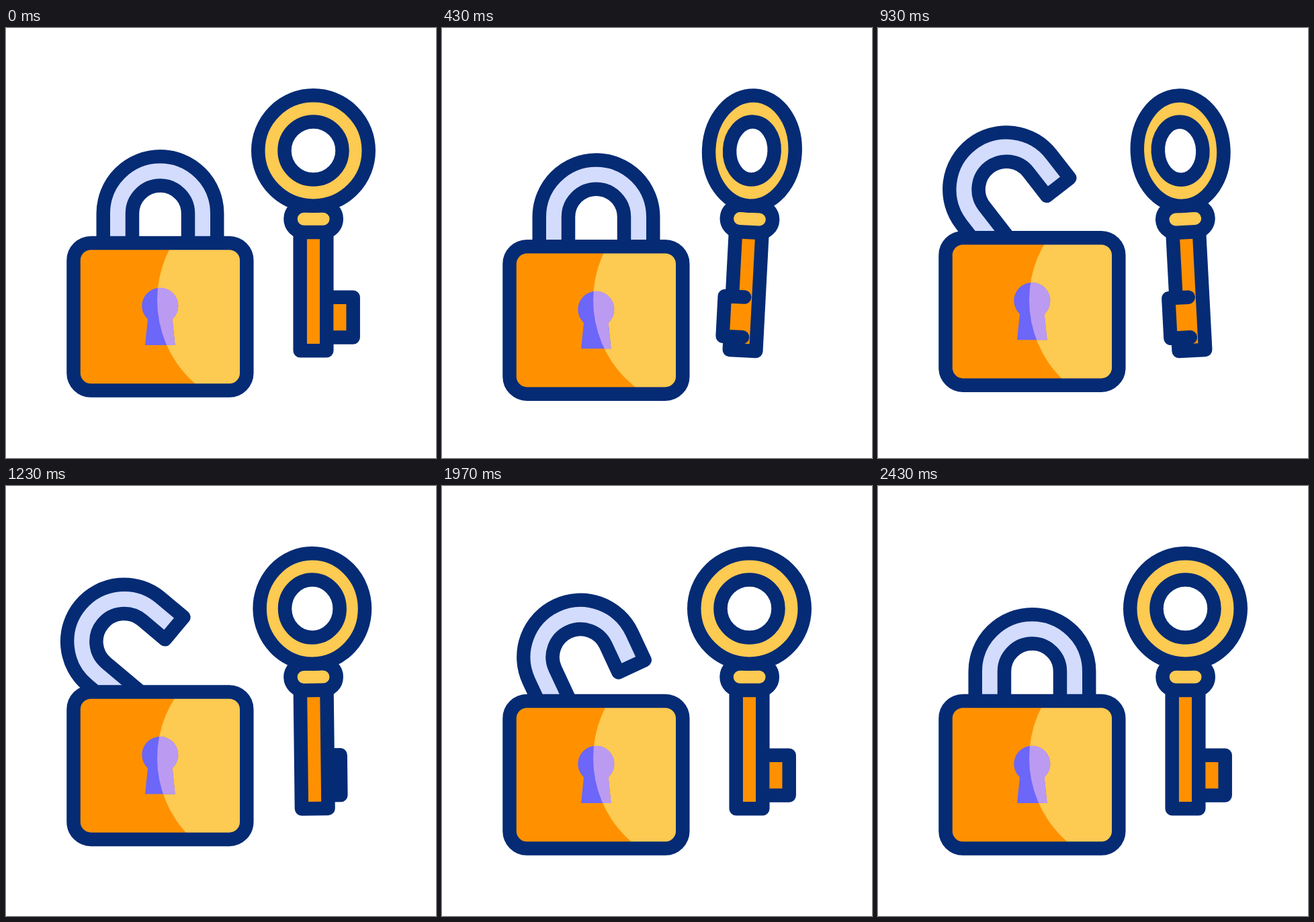
Recreate the animation shown at these times as an HTML page. Size 640 by 640 pixels, loop 2530 ms.

```html
<!DOCTYPE html>
<html lang="en">
<head>
<meta charset="utf-8">
<title>Padlock and key</title>
<style>
  html, body { margin: 0; width: 100%; height: 100%; overflow: hidden; background: #fff; }
  svg { display: block; width: 100%; height: 100%; }
  .line { stroke: #042b74; stroke-width: 20.5; stroke-linejoin: round; stroke-linecap: round; }
  .orange { fill: #ff9100; }
  .yellow { fill: #fdca52; }
  .lilac { fill: #d3dcfd; }
  .white { fill: #fff; }
  .none { fill: none; }
</style>
</head>
<body>
<svg viewBox="0 0 640 640">
  <defs>
    <path id="hole" d="M211 433.5A27 27 0 1 1 247.6 433.5L251.6 472H207Z"/>
    <rect id="case" x="100.5" y="320" width="257.8" height="219.5" rx="26"/>
    <clipPath id="caseClip"><use id="caseShape" href="#case"/></clipPath>
    <clipPath id="shineClip"><circle cx="390" cy="405" r="165"/></clipPath>
  </defs>

  <g id="shackle">
    <path class="line lilac" d="M144.75 360V276A84.75 84.75 0 0 1 314.25 276V320.5H271V276A41.5 41.5 0 0 0 188 276V360"/>
  </g>
  <use class="orange body" href="#case"/>
  <!-- the shine stays still while the body moves under it -->
  <g clip-path="url(#caseClip)"><circle class="yellow" cx="390" cy="405" r="165"/></g>
  <use class="body" href="#hole" fill="#6c66f9"/>
  <g clip-path="url(#shineClip)"><use class="body" href="#hole" fill="#bb9af2"/></g>
  <use class="line none body" href="#case"/>

  <g id="key">
    <path id="bitBack" class="line orange"/>
    <path class="line orange" d="M437.7 300V480.2H477.3V300Z"/>
    <path id="bitFront" class="line orange"/>
    <rect class="line yellow" x="423.5" y="264.5" width="68.3" height="39.5" rx="19.7"/>
    <ellipse id="ring" class="line yellow" cy="182.5" ry="82.2"/>
    <ellipse id="eye" class="line white" cy="182.5" ry="43"/>
  </g>
</svg>
<script>
const LOOP = 2530, STEP = 100 / 3;
const $ = id => document.getElementById(id);
const set = (el, attrs) => { for (const k in attrs) el.setAttribute(k, attrs[k]); };
const bodies = [...document.querySelectorAll('.body'), $('caseShape')];

// Eased value at step f; keys are [step, value] pairs.
function track(f, keys) {
  if (f <= keys[0][0]) return keys[0][1];
  for (let i = 1; i < keys.length; i++) {
    const [a, from] = keys[i - 1], [b, to] = keys[i];
    if (f <= b) {
      const u = (f - a) / (b - a);
      return from + (to - from) * u * u * (3 - 2 * u);
    }
  }
  return keys[keys.length - 1][1];
}

const BOB = [[7, 0], [20, 11.8], [33, -17.5], [46, 0]];
const OPEN = [[20, 0], [33, 56.5], [37, 50], [53, 50], [65, 0]];
const TURN = [[0, 0], [13, 1], [28, 1], [41, 0]];
const TILT = [[0, 0], [13, 3], [20, -3], [28, -3], [41, 0]];

function draw(ms) {
  const f = Math.floor((ms % LOOP + 3.4) / STEP);

  const dy = track(f, BOB);
  for (const el of bodies) set(el, { transform: `translate(0 ${dy})` });
  set($('shackle'), { transform: `translate(0 ${dy}) rotate(${-track(f, OPEN)} 169.5 318)` });

  const p = track(f, TURN);
  const mix = (a, b) => a + (b - a) * p;
  const cx = mix(457.5, 455.75);
  set($('key'), { transform: `rotate(${track(f, TILT)} 457.5 290)` });
  set($('ring'), { cx, rx: mix(82.25, 64.25) });
  set($('eye'), { cx, rx: mix(43, 33.3) });

  // The bit passes to the near side of the shaft once it has folded flat.
  const base = mix(487.5, 456), tip = mix(516.7, 426.5);
  const front = tip < base;
  set($('bitBack'), { d: front ? '' : `M${base} 400.8H${tip}V460.5H${base}` });
  set($('bitFront'), { d: front ? `M${base} 400.8H${tip}V460.5H${base}` : '' });
}

const start = performance.now();
function tick() {
  draw(performance.now() - start);
  requestAnimationFrame(tick);
}
tick();
</script>
</body>
</html>
```
